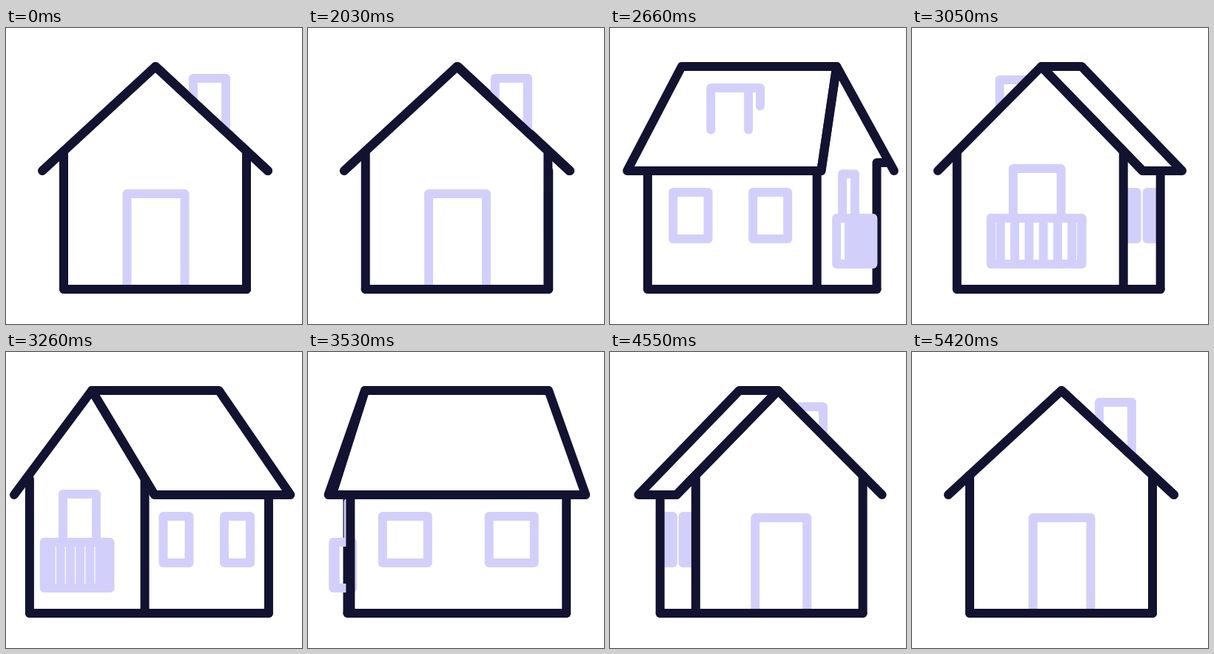
An HTML page with a canvas that plays this animation: 400 px wide and 400 px high, repeating every 5450 ms.

```html
<!DOCTYPE html>
<html lang="en">
<head>
<meta charset="utf-8">
<title>Turning house</title>
<style>
  html, body { margin: 0; width: 100%; height: 100%; overflow: hidden; background: #fff; }
  canvas { display: block; width: 400px; height: 400px; }
</style>
</head>
<body>
<canvas id="stage" width="400" height="400"></canvas>
<script>
const ctx = document.getElementById('stage').getContext('2d');
const DARK = '#121331', LIGHT = '#d2d0fa';
const LOOP = 5450, START = 2000, TURN = 3400, STEP = 30;
const RIDGE = 52, EAVE = 193, BASE = 353;

// Outline poses: gable on, three-quarter, side on
const OUTLINE = {
  tip: [49, 8, 28],
  apex: [202, 123, 76],
  eave: [354, 231, 28],
  ridge: [202, 281, 326],
  far: [354, 386, 375],
  wall: [78, 28, 54],
  corner: [325, 211, 54],
  farWall: [325, 356, 349],
  wallTop: [167, 168, 193]
};
const MIRROR = 403;

const lerp = (a, b, k) => a + (b - a) * k;

// Value of a keyed track whose first key sits at position `from`
function track(keys, p, from = 0) {
  const u = Math.min(Math.max(p - from, 0), keys.length - 1);
  const i = Math.min(Math.floor(u), keys.length - 2);
  return lerp(keys[i], keys[i + 1], u - i);
}

function ease(x) {
  const x1 = 0.19, x2 = 0.238;
  let lo = 0, hi = 1;
  for (let i = 0; i < 30; i++) {
    const s = (lo + hi) / 2, r = 1 - s;
    if (3 * s * r * r * x1 + 3 * s * s * r * x2 + s * s * s < x) lo = s; else hi = s;
  }
  return lo * lo * (3 - 2 * lo);
}

function trace(pts, close) {
  ctx.beginPath();
  pts.forEach(([x, y], i) => i ? ctx.lineTo(x, y) : ctx.moveTo(x, y));
  if (close) ctx.closePath();
}
function line(color, pts, close) {
  trace(pts, close);
  ctx.strokeStyle = color;
  ctx.stroke();
}
function fill(pts) {
  trace(pts, true);
  ctx.fillStyle = '#fff';
  ctx.fill();
}
const box = (l, t, r, b) => [[l, t], [r, t], [r, b], [l, b]];

function outline(p) {
  const q = Math.min(Math.floor(p / 2), 3), v = p - 2 * q;
  const flip = q % 2 === 1, w = flip ? 2 - v : v;
  const h = { q };
  for (const key in OUTLINE) {
    const n = track(OUTLINE[key], w);
    h[key] = flip && key !== 'wallTop' ? MIRROR - n : n;
  }
  return h;
}

function chimneyBehind(p) {
  const l = track([106, 142, 185, 226, 253], p, 4);
  const r = track([150, 180, 245, 270, 297], p, 4);
  const top = track([68, 74, 85, 86, 68], p, 4);
  const bl = track([140, 140, 140, 120, 97], p, 4);
  const br = track([97, 120, 140, 140, 140], p, 4);
  line(LIGHT, [[l, bl], [l, top], [r, top], [r, br]]);
}

function chimneyFront(p) {
  const a = track([297, 246, 157, 110, 106], p);
  const b = track([297, 284, 218, 148, 106], p);
  const depth = track([44, 36, 0, 36, 44], p);
  const top = track([68, 76, 85, 76, 68], p);
  const low = track([140, 138, 137, 138, 140], p);
  const high = track([97, 101, 109, 101, 97], p);
  const [near, other, c] = p < 2 ? [a, b, a - depth] : [b, a, b + depth];
  fill([[c, high], [c, top], [other, top], [other, low], [near, low]]);
  line(LIGHT, [[c, high], [c, top], [other, top], [other, low]]);
  line(LIGHT, [[near, top], [near, low]]);
}

function windows(h) {
  const cuts = h.q < 2 ? [0.173, 0.38, 0.645, 0.85] : [0.149, 0.358, 0.642, 0.851];
  const l = Math.min(h.corner, h.farWall), wide = Math.abs(h.farWall - h.corner);
  const at = i => h.q < 2 ? l + wide * (cuts[i] - 0.023) : l + wide * cuts[i];
  for (const i of [0, 2]) line(LIGHT, box(at(i), 222, at(i + 1), 285), true);
}

function frontDoor(p) {
  const late = p > 4;
  const l = late ? track([349, 262, 163.5], p, 6) : track([163.5, 86, 54], p);
  const r = late ? track([349, 316, 241.5], p, 6) : track([241.5, 141, 54], p);
  line(LIGHT, [[l, BASE], [l, 224], [r, 224], [r, BASE]]);
}

function backDoor(p) {
  const l = track([349, 270, 166, 81, 54], p, 2);
  const r = track([349, 308, 237, 134, 54], p, 2);
  const top = track([203, 190, 190, 190, 203], p, 2);
  line(LIGHT, [[l, 257], [l, top], [r, top], [r, 257]]);
}

function balcony(p) {
  const l = track([340, 349, 252, 134, 55, 34, 53], p, 1);
  const fl = track([350, 368, 266, 134, 55, 34, 53], p, 1);
  const fr = track([350, 368, 339, 269, 153, 34, 53], p, 1);
  const r = track([350, 368, 339, 269, 155, 58, 63], p, 1);
  line(LIGHT, box(l, 257, r, 319), true);
  const post = x => line(LIGHT, [[x, 257], [x, 319]]);
  post(fl);
  post(fr);
  for (let i = 0; i < 6; i++) post(lerp(fl, fr, 0.105 + 0.158 * i));
}

function draw(p) {
  const h = outline(p);
  const backView = p >= 2 && p <= 6;
  ctx.fillStyle = '#fff';
  ctx.fillRect(0, 0, 400, 400);
  ctx.lineWidth = 12;
  ctx.lineCap = ctx.lineJoin = 'round';

  if (p > 4) chimneyBehind(p);
  if (!backView && p > 1 && p < 7) balcony(p);

  fill([[h.tip, EAVE], [h.apex, RIDGE], [h.ridge, RIDGE], [h.far, EAVE]]);
  fill(box(h.wall, EAVE - 5, h.farWall, BASE));

  // The outer gable wall reaches sideways to the roof slope
  const slope = lerp(h.apex, h.tip, (h.wallTop - RIDGE) / (EAVE - RIDGE));
  windows(h);
  line(DARK, [[h.farWall, BASE], [h.farWall, Math.max(h.wallTop, EAVE)]]);
  line(DARK, [[h.wall, BASE], [h.wall, h.wallTop], [slope, h.wallTop]]);
  if (backView) {
    backDoor(p);
    balcony(p);
  } else {
    frontDoor(p);
  }
  line(DARK, [[h.corner, h.wallTop], [h.corner, BASE]]);
  line(DARK, [[h.wall, BASE], [h.farWall, BASE]]);

  const roof = [[h.apex, RIDGE], [h.ridge, RIDGE], [h.far, EAVE], [h.eave, EAVE]];
  fill(roof);
  line(DARK, roof, true);
  if (p <= 4) chimneyFront(p);
  line(DARK, [[h.tip, EAVE], [h.apex, RIDGE], [h.eave, EAVE]]);
}

function frame() {
  const t = performance.now() % LOOP;
  const held = Math.floor((t - START) / STEP) * STEP;
  const x = Math.min(Math.max(held / TURN, 0), 1);
  draw(x === 0 || x === 1 ? 0 : 8 * ease(x));
  requestAnimationFrame(frame);
}
frame();
</script>
</body>
</html>
```
